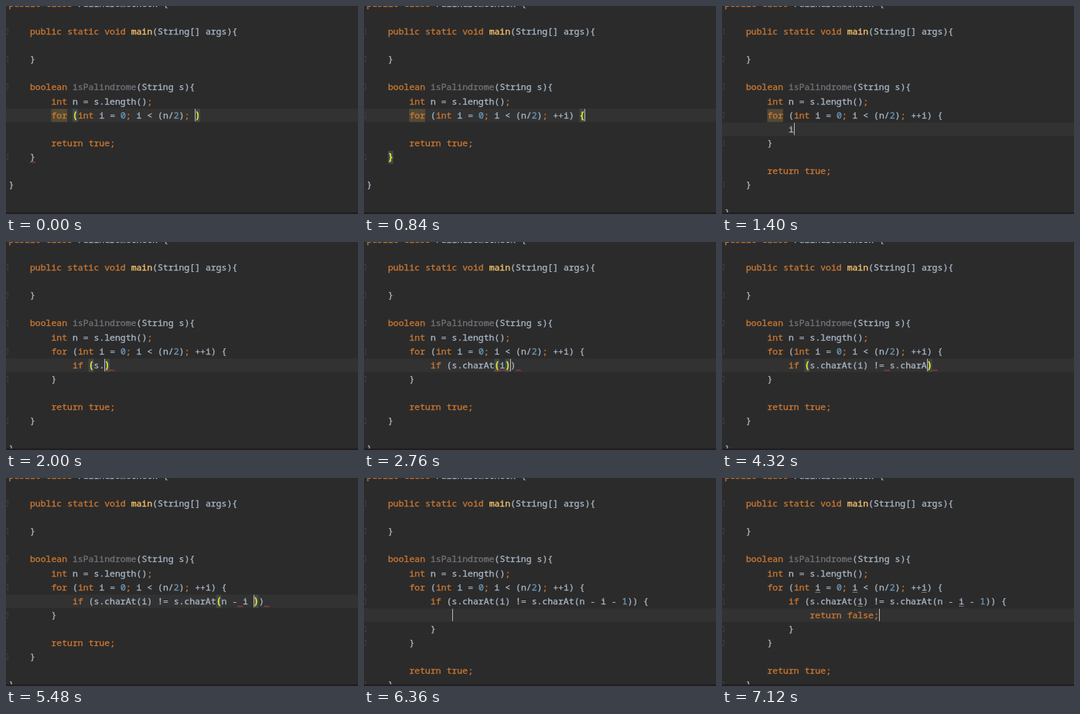
Recreate the animation shown at these times as an HTML page with a canvas. Size 455 px wide and 270 px high, loop 7160 ms.

```html
<!DOCTYPE html>
<html lang="en">
<head>
<meta charset="utf-8">
<title>Typing a palindrome check</title>
<style>
  html, body { margin: 0; width: 100%; height: 100%; overflow: hidden; background: #2b2b2b; }
  canvas { display: block; width: 455px; height: 270px; }
</style>
</head>
<body>
<canvas id="stage" width="455" height="270"></canvas>
<script>
const W = 455, H = 270, LOOP = 7160;
const CELL = 6.875, LEFT = 3.5, PITCH = 18.1, TOP = 33 - 2 * PITCH;
const FONT = '11.46px "Noto Sans Mono", "DejaVu Sans Mono", monospace';
const C = {
  bg: '#2b2b2b', row: '#323232', text: '#a9b7c6', key: '#cc7832', num: '#6897bb',
  name: '#ffc66d', unused: '#72737a', brace: '#f0e030', braceBg: '#3b4a47',
  weak: '#524a35', error: '#a84440', fold: '#3b3c3d', edge: '#211d1f', caret: '#b4b4b4'
};
const ctx = document.getElementById('stage').getContext('2d');

const head = `public class PalindromeCheck {

    public static void main(String[] args){

    }

    boolean isPalindrome(String s){
        int n = s.length();
`;
const foot = `

        return true;
    }

}`;
const INDENT = ' '.repeat(8);
const FOR_ROW = 8;

// Keystrokes: first key time, last key time, typed text, text after the caret
const keys = [
  [120, 360, '++i', ')'],
  [480, 480, ')', ''],
  [560, 640, ' {', ''],
  [1080, 1080, '\n    ', '\n}'],
  [1400, 1620, 'if ', '\n}'],
  [1720, 1720, '(', ')\n}'],
  [1840, 1960, 's.', ')\n}'],
  [2200, 2520, 'charAt', ')\n}'],
  [2600, 2600, '(', '))\n}'],
  [2680, 2680, 'i', '))\n}'],
  [2740, 2740, ')', ')\n}'],
  [3000, 3360, ' != ', ')\n}'],
  [3520, 3520, 's', ')\n}'],
  [3680, 4280, '.charA', ')\n}'],
  [4420, 4420, 't', ')\n}'],
  [4560, 4560, '(', '))\n}'],
  [4880, 4880, 'n', '))\n}'],
  [5100, 5420, ' - i ', '))\n}'],
  [5540, 5740, '- 1', '))\n}'],
  [5860, 5860, ')', ')\n}'],
  [5960, 5960, ')', '\n}'],
  [6080, 6160, ' {', '\n}'],
  [6320, 6320, '\n        ', '\n    }\n}'],
  [6420, 6900, 'return false;', '\n    }\n}']
];

function typedAt(t) {
  let left = 'for (int i = 0; i < (n/2); ', tail = ')';
  for (const [from, to, text, after] of keys) {
    if (t < from) break;
    const gap = (to - from) / Math.max(1, text.length - 1);
    const count = gap ? Math.floor((t - from) / gap + 1e-6) + 1 : text.length;
    left += text.slice(0, count);
    tail = after;
  }
  return [left, tail];
}

const colX = col => LEFT + col * CELL;
const rowY = row => TOP + row * PITCH;

function place(text, at) {
  const before = text.slice(0, at).split('\n');
  return { row: before.length - 1, col: before[before.length - 1].length };
}

function partner(text, at) {
  const step = '([{'.includes(text[at]) ? 1 : -1;
  for (let i = at, depth = 0; i >= 0 && i < text.length; i += step) {
    if ('([{'.includes(text[i])) depth++;
    if (')]}'.includes(text[i])) depth--;
    if (depth === 0) return i;
  }
  return -1;
}

function matched(text, caret) {
  const isBrace = i => i < text.length && '()[]{}'.includes(text[i]);
  const at = [caret - 1, caret].find(isBrace);
  if (at === undefined) return [];
  const other = partner(text, at);
  return other < 0 ? [] : [at, other];
}

function colorOf(word) {
  if (/^(public|class|static|void|boolean|int|for|if|return|true|false|;)$/.test(word)) return C.key;
  if (/^\d/.test(word)) return C.num;
  if (word === 'main') return C.name;
  if (word === 'isPalindrome') return C.unused;
  return C.text;
}

function box(row, col, count, color) {
  ctx.fillStyle = color;
  ctx.fillRect(colX(col), rowY(row) - 8, count * CELL, 17);
}

// A hairline outline gives the glyphs a slightly heavier, softer stroke
function write(word, row, col, color, weight = '') {
  const x = colX(col), y = rowY(row) + 4;
  ctx.font = weight + FONT;
  ctx.fillStyle = ctx.strokeStyle = color;
  ctx.lineWidth = 0.3;
  ctx.fillText(word, x, y);
  ctx.strokeText(word, x, y);
}

function squiggle(row, col, count = 1) {
  const x = colX(col), y = rowY(row) + 7;
  ctx.strokeStyle = C.error;
  ctx.lineWidth = 1;
  ctx.beginPath();
  for (let i = 0; i <= count * 4; i++) ctx.lineTo(x + i * CELL / 4, y + (i % 2 ? -1 : 1));
  ctx.stroke();
}

function drawErrors(lines, left, t) {
  if (t < 640) squiggle(11, 4);
  const row = FOR_ROW + 1, line = lines[row];
  if (!/^\s+if/.test(line) || line.endsWith('{')) return;
  squiggle(row, line.length);
  if (left.endsWith('.') && t < 2200) squiggle(row, line.length - 1);
  if (t >= 2600 && t < 3000) squiggle(row, line.indexOf('(i'), 3);
  const ops = [...line.matchAll(/!=|-/g)];
  const op = ops[ops.length - 1];
  if (op && t < 5860 && (op[0] === '-' || t < 4560)) squiggle(row, op.index + op[0].length);
}

function drawFold(row) {
  ctx.strokeStyle = C.fold;
  ctx.lineWidth = 1;
  ctx.strokeRect(-3.5, Math.round(rowY(row)) - 3.5, 6, 7);
}

function draw(t) {
  const [left, tail] = typedAt(t);
  const pad = s => s.replace(/\n/g, '\n' + INDENT);
  const start = head + INDENT + pad(left);
  const text = start + pad(tail) + foot;
  const lines = text.split('\n');
  const caret = place(text, start.length);

  ctx.fillStyle = C.bg;
  ctx.fillRect(0, 0, W, H);
  ctx.fillStyle = C.row;
  ctx.fillRect(0, rowY(caret.row) - 8.5, W, 17.5);

  if (t < 1620) box(FOR_ROW, 8, 3, C.weak);
  const braces = matched(text, start.length).map(i => place(text, i));
  for (const b of braces) box(b.row, b.col, 1, C.braceBg);

  lines.forEach((line, row) => {
    if (row > 0 && /^ {4}.*(\{|\})$/.test(line)) drawFold(row);
    for (const m of line.matchAll(/\w+|[^\w\s]/g)) {
      const lit = braces.some(b => b.row === row && b.col === m.index);
      write(m[0], row, m.index, lit ? C.brace : colorOf(m[0]), lit ? 'bold ' : '');
      if (m[0] === 'i' && t >= 6960) {
        ctx.fillStyle = C.unused;
        ctx.fillRect(colX(m.index), Math.round(rowY(row)) + 6, CELL, 1);
      }
    }
  });

  drawErrors(lines, left, t);
  ctx.fillStyle = C.caret;
  ctx.fillRect(Math.round(colX(caret.col)), rowY(caret.row) - 8, 1, 16);
  ctx.fillStyle = C.edge;
  ctx.fillRect(0, 268, W, 2);
}

let origin;
function tick(now) {
  if (origin === undefined) origin = now;
  draw((now - origin) % LOOP);
  requestAnimationFrame(tick);
}
draw(0);
requestAnimationFrame(tick);
</script>
</body>
</html>
```
